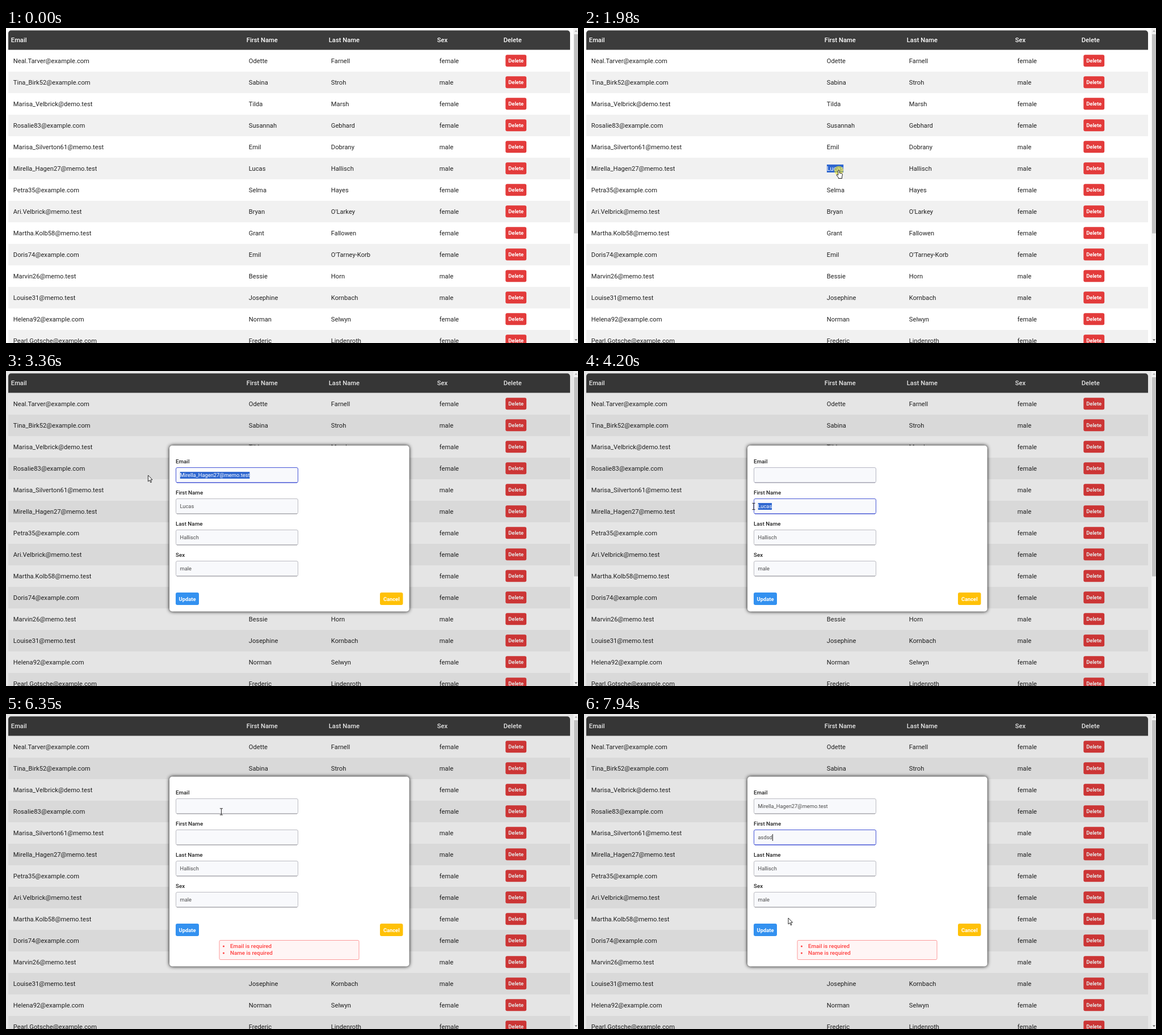
Write an HTML page with a canvas that moves like this. It is 1008 px wide and 556 px high and loops after 8000 ms.

```html
<!DOCTYPE html>
<html lang="en">
<head>
<meta charset="utf-8">
<title>User table</title>
<style>
html, body { margin: 0; width: 100%; height: 100%; overflow: hidden; background: #fff; }
canvas { display: block; width: 1008px; height: 556px; }
</style>
</head>
<body>
<canvas id="stage"></canvas>
<script>
const W = 1008, H = 556, LOOP = 8000;
const canvas = document.getElementById('stage');
const ctx = canvas.getContext('2d');
const dpr = window.devicePixelRatio || 1;
canvas.width = W * dpr;
canvas.height = H * dpr;

const COLS = [9, 424, 569, 760, 877];
const HEADS = ['Email', 'First Name', 'Last Name', 'Sex', 'Delete'];
const ROWS = [
  'Neal.Tarver@example.com|Odette|Farnell|female',
  'Tina_Birk52@example.com|Sabina|Stroh|male',
  'Marisa_Velbrick@demo.test|Tilda|Marsh|female',
  'Rosalie83@example.com|Susannah|Gebhard|female',
  'Marisa_Silverton61@memo.test|Emil|Dobrany|male',
  'Mirella_Hagen27@memo.test|Lucas|Hallisch|male',
  'Petra35@example.com|Selma|Hayes|female',
  'Ari.Velbrick@memo.test|Bryan|O\'Larkey|female',
  'Martha.Kolb58@memo.test|Grant|Fallowen|female',
  'Doris74@example.com|Emil|O\'Tarney-Korb|female',
  'Marvin26@memo.test|Bessie|Horn|male',
  'Louise31@memo.test|Josephine|Kornbach|male',
  'Helena92@example.com|Norman|Selwyn|female',
  'Pearl.Gotsche@example.com|Frederic|Lindenroth|female'
].map(r => r.split('|'));
const PICKED = ROWS[5];

const font = (weight, size) => `${weight} ${size}px Roboto, sans-serif`;
const BODY = font(400, 11.2), HEAD = font(500, 11.2), LABEL = font(500, 9.8);
const INPUT = font(400, 9.33), BUTTON = font(700, 9.33);

const ROW_H = 38, ROWS_TOP = 39;
const FIELD = { x: 299, w: 216, h: 27.5, top: 170, pitch: 55 };
const GROWTH = 21; // the dialog moves up this far when errors appear
const PRESS = 140;

const clamp = v => Math.max(0, Math.min(1, v));
const smooth = p => p * p * (3 - 2 * p);
const slowing = p => 1 - (1 - p) ** 2;

// Pointer travels; it rests in between
const START = { x: 977, y: 546 };
const MOVES = [
  { from: 460, to: 1230, x: 452, y: 287, ease: slowing },
  { from: 1230, to: 1510, x: 449, y: 251 },
  { from: 2120, to: 2890, x: 429, y: 184 },
  { from: 2960, to: 3620, x: 158, y: 184 },
  { from: 3620, to: 3990, x: 334, y: 239 },
  { from: 4060, to: 4200, x: 299, y: 239 },
  { from: 4340, to: 4760, x: 326, y: 405 },
  { from: 5580, to: 6400, x: 380, y: 170 },
  { from: 6630, to: 6840, x: 372, y: 225 },
  { from: 7590, to: 7940, x: 360, y: 360 }
];

// What the user does; the state at any time is the sum of the events before it
const EVENTS = [
  { t: 1840, press: true },
  { t: 1980, press: true, marked: true },
  { t: 2120, open: true, focus: 0, home: true },
  { t: 2960, press: true, select: 0, home: false },
  { t: 3780, select: -1, email: '' },
  { t: 4060, press: true, focus: 1, select: 1 },
  { t: 4270, select: -1, first: '' },
  { t: 5030, press: true, focus: -1 },
  { t: 5310, failed: true },
  { t: 6420, press: true, focus: 0 },
  { t: 6630, email: PICKED[0] },
  { t: 7110, press: true, focus: 1 },
  ...[...'asdsd'].map((c, i, all) => ({ t: 7590 + i * 70, first: all.slice(0, i + 1).join('') }))
];

function stateAt(t) {
  const s = { focus: -1, select: -1, email: PICKED[0], first: PICKED[1], since: 0, edited: 0, pressed: -PRESS };
  for (const e of EVENTS.filter(e => e.t <= t)) {
    if ('focus' in e) {
      s.previous = s.focus;
      s.since = e.t;
    }
    if (e.press) s.pressed = e.t;
    s.edited = e.t;
    Object.assign(s, e);
  }
  return s;
}

function pointerAt(t) {
  let { x, y } = START;
  for (const m of MOVES) {
    const p = (m.ease || smooth)(clamp((t - m.from) / (m.to - m.from)));
    x += (m.x - x) * p;
    y += (m.y - y) * p;
  }
  return { x, y };
}

function rect(x, y, w, h, color) {
  ctx.fillStyle = color;
  ctx.fillRect(x, y, w, h);
}

function box(x, y, w, h, r, fill, stroke) {
  ctx.beginPath();
  ctx.roundRect(x, y, w, h, r);
  ctx.fillStyle = fill;
  ctx.fill();
  if (stroke) {
    ctx.strokeStyle = stroke;
    ctx.lineWidth = 1;
    ctx.stroke();
  }
}

function dot(x, y, r, color) {
  ctx.beginPath();
  ctx.arc(x, y, r, 0, 2 * Math.PI);
  ctx.fillStyle = color;
  ctx.fill();
}

function text(s, x, y, face, color, align = 'left') {
  ctx.font = face;
  ctx.fillStyle = color;
  ctx.textAlign = align;
  ctx.fillText(s, x, y);
}

function widthOf(s, face) {
  ctx.font = face;
  return ctx.measureText(s).width;
}

function button(s, x, y, w, h, color) {
  box(x, y, w, h, 3, color);
  text(s, x + w / 2, y + h / 2 + 3.5, BUTTON, '#fff', 'center');
}

// Repaints the part of a text between x0 and x1 as selected
function highlight(s, x, y, face, x0, x1, top, h) {
  ctx.save();
  ctx.beginPath();
  ctx.rect(x0, top, x1 - x0, h);
  ctx.clip();
  rect(x0, top, x1 - x0, h, '#2f67d0');
  text(s, x, y, face, '#fff');
  ctx.restore();
}

function drawTable(state) {
  rect(0, 0, W, H, '#fff');
  box(4, 4.2, 990, 34.4, [5, 5, 0, 0], '#3c3c3c');
  HEADS.forEach((s, i) => text(s, COLS[i] - 0.2, 25, HEAD, '#fff'));
  ROWS.forEach((row, i) => {
    const y = ROWS_TOP + i * ROW_H;
    if (i % 2) rect(4, y, 990, ROW_H, '#f1f1f1');
    row.forEach((s, c) => {
      const x = COLS[c] + 3.8;
      text(s, x, y + 23, BODY, '#212121');
      if (state.marked && row === PICKED && c === 1) {
        highlight(s, x, y + 23, BODY, x, x + widthOf(s, BODY), y + 12, 14);
      }
    });
    button('Delete', 880.3, y + 8.3, 36.8, 21, '#e33b3b');
  });
}

function triangle(x, y, dir, color) {
  ctx.beginPath();
  ctx.moveTo(x - 2.5, y + dir);
  ctx.lineTo(x + 2.5, y + dir);
  ctx.lineTo(x, y - dir * 1.5);
  ctx.fillStyle = color;
  ctx.fill();
}

function drawScrollbar() {
  rect(1000, 0, 8, H, '#f1f1f1');
  rect(1001, 11, 7, 351.5, '#c1c1c1');
  triangle(1004.5, 5.5, 1, '#a3a3a3');
  triangle(1004.5, 550.5, -1, '#505050');
}

function focusAmount(i, state, t) {
  const fade = clamp((t - state.since) / 150);
  return i === state.focus ? fade : i === state.previous ? 1 - fade : 0;
}

function drawField(i, y, value, state, t, pointerX) {
  const { x, w, h } = FIELD;
  const f = focusAmount(i, state, t);
  const mix = (a, b) => Math.round(a + (b - a) * f);
  const tone = grey => `rgb(${mix(grey, 68)},${mix(grey, 84)},${mix(grey + 6, 214)})`;
  box(x + 0.5, y + 0.5, w - 1, h - 1, 2.5, '#f8f9fc', tone(188));
  rect(x + 2, y + h - 1, w - 4, 1, tone(158));

  const left = x + 7.5, base = y + 17;
  const right = left + widthOf(value, INPUT);
  text(value, left, base, INPUT, '#4a4a4a');
  if (state.select === i) {
    const from = Math.max(left, Math.min(pointerX, right));
    highlight(value, left, base, INPUT, from, right, y + 8, 12);
  } else if (state.focus === i && (t - state.edited) % 1000 < 500) {
    rect(state.home ? left : right + 0.3, y + 8, 0.9, 12, '#111');
  }
}

function drawErrors() {
  box(376, 399.5, 246, 34, 2, '#fff5f5', '#fc9a9a');
  ['Email is required', 'Name is required'].forEach((s, i) => {
    const y = 413.2 + i * 12;
    dot(383.5, y - 3.2, 1.5, '#ff3f3f');
    text(s, 395, y, LABEL, '#ff3f3f');
  });
}

function drawDialog(state, t, pointerX) {
  const up = state.failed ? GROWTH : 0;
  rect(0, 0, 1000, H, 'rgba(0,0,0,.1)');
  ctx.save();
  ctx.shadowColor = '#000';
  ctx.shadowBlur = 6 * dpr;
  box(288, 131.5 - up, 422.7, 293 + 2 * up, 5, '#fff');
  ctx.restore();

  [state.email, state.first, PICKED[2], PICKED[3]].forEach((value, i) => {
    const y = FIELD.top - up + i * FIELD.pitch;
    text(HEADS[i], FIELD.x, y - 7, LABEL, '#212121');
    drawField(i, y, value, state, t, pointerX);
  });
  button('Update', 299, 391 - up, 41, 22, '#3391f0');
  button('Cancel', 659, 391 - up, 40.5, 22, '#ffc107');
  if (state.failed) drawErrors();
}

const HAND = new Path2D('M-1.2 9V.8Q0 -.6 1.2 .8V5L5.5 6Q6.6 6.4 6.4 8L5.6 12V14.5H-.6V13L-4 8.8Q-4.2 7.4 -2.8 7.6Z');
const ARROW = new Path2D('M0 0V11L2.6 8.6L4.4 12.8L6 12.1L4.3 8H7.6Z');
const BEAM = new Path2D('M0 -5.2V5.2M-2.6 -5.6H2.6M-2.6 5.6H2.6');

function pointerShape({ x, y }, state) {
  if (!state.open) return HAND;
  const down = y - FIELD.top + (state.failed ? GROWTH : 0);
  const inField = x >= FIELD.x && x <= FIELD.x + FIELD.w &&
    down >= 0 && down < 4 * FIELD.pitch && down % FIELD.pitch <= FIELD.h;
  return inField ? BEAM : ARROW;
}

function drawPointer(at, state, t) {
  if (t - state.pressed < PRESS) dot(at.x, at.y + 0.5, 8, 'rgba(240,230,40,.6)');
  const shape = pointerShape(at, state);
  ctx.save();
  ctx.translate(at.x, at.y);
  ctx.lineJoin = 'round';
  ctx.lineWidth = 0.9;
  ctx.strokeStyle = '#111';
  ctx.fillStyle = '#fff';
  if (shape !== BEAM) ctx.fill(shape);
  ctx.stroke(shape);
  ctx.restore();
}

function draw(t) {
  const state = stateAt(t);
  const at = pointerAt(t);
  ctx.setTransform(dpr, 0, 0, dpr, 0, 0);
  drawTable({ ...state, marked: state.marked && !state.open });
  if (state.open) drawDialog(state, t, at.x);
  drawScrollbar();
  if (t >= MOVES[0].from) drawPointer(at, state, t);
}

const begin = performance.now();
function tick() {
  draw((performance.now() - begin) % LOOP);
  requestAnimationFrame(tick);
}
tick();
</script>
</body>
</html>
```
